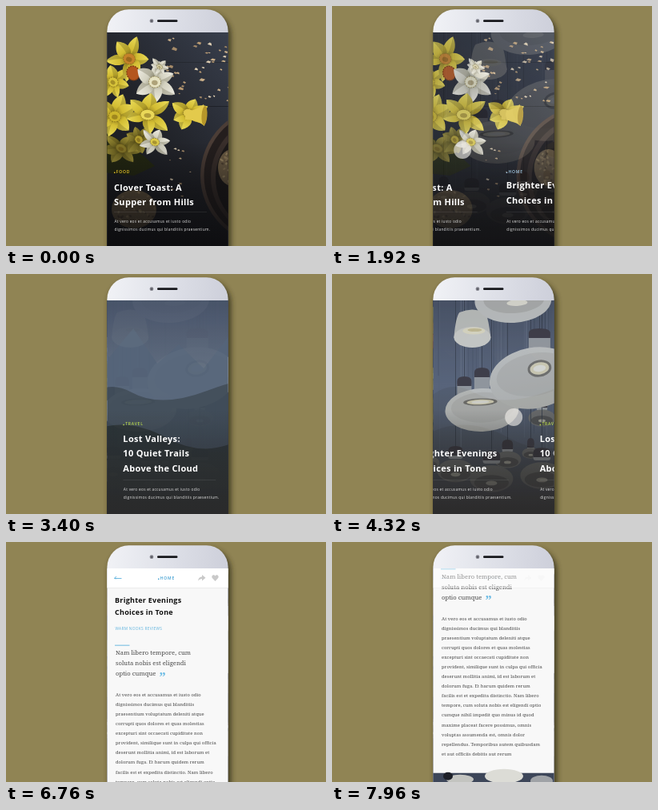
Write an HTML page that moves like this. It is 400 px wide and 300 px high and loops after 8 s.

```html
<!DOCTYPE html>
<html lang="en">
<head>
<meta charset="utf-8">
<title>Magazine app</title>
<style>
html, body { margin: 0; width: 100%; height: 100%; overflow: hidden; background: #908454; }
svg { display: block; width: 100vw; height: 100vh; }
.head { font: bold 11px "Open Sans", sans-serif; letter-spacing: .3px; fill: #fff; }
.tag { font: 600 5px "Open Sans", sans-serif; letter-spacing: .8px; }
.intro { font: 4.8px "Open Sans", sans-serif; letter-spacing: .26px; fill: #dedede; }
.title { font: bold 9px "Open Sans", sans-serif; letter-spacing: .25px; fill: #111; }
.by { font: 4.8px "Open Sans", sans-serif; letter-spacing: .3px; fill: #5fb3de; }
.quote { font: 7.6px "Noto Serif", serif; letter-spacing: .05px; fill: #484848; }
.body { font: 5.8px "Noto Serif", serif; letter-spacing: .06px; fill: #484848; }
</style>
</head>
<body>
<svg id="stage" viewBox="0 0 400 300" preserveAspectRatio="none"></svg>
<script>
const LOOP = 8000, PAGE = 151, DRIFT = 27;
const stage = document.getElementById('stage');

let seed = 11;
const rnd = (a, b) => {
  seed = (seed * 16807) % 2147483647;
  return a + (b - a) * seed / 2147483647;
};
const pick = list => list[Math.floor(rnd(0, list.length))];
const times = (n, fn) => Array.from({ length: n }, (_, i) => fn(i)).join('');
const rect = (x, y, w, h, fill, more = '') =>
  `<rect x="${x}" y="${y}" width="${w}" height="${h}" fill="${fill}" ${more}/>`;
const oval = (x, y, rx, ry, fill, turn = 0, more = '') =>
  `<ellipse cx="${x}" cy="${y}" rx="${rx}" ry="${ry}" fill="${fill}" transform="rotate(${turn} ${x} ${y})" ${more}/>`;
const path = (d, fill, more = '') => `<path d="${d}" fill="${fill}" ${more}/>`;
const text = (x, y, cls, s, more = '') => `<text x="${x}" y="${y}" class="${cls}" ${more}>${s}</text>`;
const lines = (x, y, step, cls, list) => list.map((s, i) => text(x, y + i * step, cls, s)).join('');
const grad = (id, dir, stops) => `<linearGradient id="${id}" ${dir}>` +
  stops.map(([o, c, a = 1]) => `<stop offset="${o}" stop-color="${c}" stop-opacity="${a}"/>`).join('') +
  '</linearGradient>';
const DOWN = 'x1="0" y1="0" x2="0" y2="1"';

// Pictures
function flower(x, y, r, paint, core, turn, squash = 1) {
  const leaf = i => {
    const len = r * rnd(.82, 1.12), w = r * rnd(.34, .5);
    const half = `M0 0C${w} ${-len * .25} ${w * .8} ${-len * .7} 0 ${-len}`;
    return `<g transform="rotate(${i * 60 + rnd(-14, 14)})">` +
      path(`${half}C${-w * .8} ${-len * .7} ${-w} ${-len * .25} 0 0Z`, `url(#${paint})`) +
      path(half + `Q${w * .25} ${-len * .5} 0 0Z`, '#2a2408', 'opacity=".2"') + '</g>';
  };
  return `<g transform="translate(${x} ${y}) rotate(${turn}) scale(1 ${squash})">` + times(6, leaf) +
    oval(0, 0, r * .28, r * .25, core, 0, 'stroke="#6e5a14" stroke-opacity=".5" stroke-dasharray="2 1"') +
    oval(0, r * .03, r * .14, r * .11, '#5a430c', 0, 'opacity=".4"') + '</g>';
}

function crumb(x, y, size) {
  const p = () => rnd(.5, 1.2) * size;
  return path(`M${x - p()} ${y}L${x - p() * .3} ${y - p() * .7} ${x + p()} ${y - p() * .3} ${x + p() * .6} ${y + p() * .6}Z`,
    pick(['#c9ae88', '#ddcdb2', '#a58a68', '#b99a72']));
}

const cookie = (x, y, rx, ry) => oval(x, y, rx, ry, '#6a5a42') + times(45, () => {
  const a = rnd(0, 6.28), d = Math.sqrt(rnd(0, .9));
  return oval(x + rx * d * Math.cos(a), y + ry * d * Math.sin(a), 1.8, 1.2,
    pick(['#8d7a58', '#43372a', '#a08c66']), rnd(0, 180), 'opacity=".7"');
});

function foodArt() {
  return rect(90, 33, 225, 267, 'url(#slate)') +
    rect(195, 125, 120, 1, '#15171c', 'opacity=".6"') + rect(195, 70, 120, .8, '#15171c', 'opacity=".4"') +
    times(56, () => crumb(rnd(202, 304), rnd(40, 120), rnd(1.4, 4))) +
    times(10, () => crumb(rnd(196, 246), rnd(178, 248), rnd(1.2, 2.8))) +
    oval(331, 212, 88, 87, '#4b3d36') + oval(332, 212, 84.5, 83, '#241e1d') +
    oval(337, 214, 81, 78, '#382e2a') + oval(340, 215, 78, 74, '#1b1818') +
    cookie(283, 202, 18, 23) + cookie(160, 254, 28, 24) +
    path('M100 150Q150 165 186 200L160 212 100 206Z', '#24280f', 'opacity=".9"') +
    flower(144, 178, 25, 'olive', '#847527', 25, .8) +
    flower(136, 138, 27, 'gold', '#cdb62c', 10) +
    flower(166, 167, 19, 'olive', '#b29e30', 50) +
    flower(134, 95, 23, 'gold', '#d8c43a', 40) +
    flower(154, 66, 27, 'gold', '#c5822a', 18) +
    oval(159, 84, 8, 9, '#b4561e', -20, 'stroke="#7e3910" stroke-width="1.4" stroke-dasharray="2 1"') +
    flower(186, 95, 27, 'cream', '#e6e2c2', 8, 1.05) +
    flower(192, 76, 13, 'cream', '#d8d3ae', 30, .8) +
    flower(186, 170, 21, 'cream', '#dcca4a', 20, .9) +
    flower(177, 136, 32, 'gold', '#ead858', 4, .82) +
    flower(228, 134, 24, 'gold', '#e0c84a', 14, .9) +
    path('M224 131Q236 132 247 123Q252 136 248 150Q238 142 224 142Z', '#e3ca4c') +
    oval(248, 137, 3.5, 12, '#b6962a', 4);
}

// A lampshade; lx, ly, lr and lt place its opening
function shade(x, y, rx, ry, turn, lx, ly, lr, lt) {
  return oval(x, y, rx, ry, 'url(#glass)', turn) +
    oval(x + 1, y - ry * .12, rx * .86, ry * .7, '#b4b2ab', turn, 'opacity=".4"') +
    oval(lx, ly, lr * 1.25, lt * 1.4, '#77736a', turn) +
    oval(lx, ly, lr, lt, '#efe7c4', turn) + oval(lx, ly, lr * .65, lt * .55, '#fffdf0', turn);
}
const stem = (x, y, h, w = 18) =>
  rect(x - .4, 33, .8, y - 33, '#2e3440') + rect(x - w / 2, y + 8, w, h, '#a4a7aa', 'rx="3"') +
  path(`M${x - w / 2} ${y + 12}V${y + 6}Q${x - w / 2} ${y} ${x} ${y}T${x + w / 2} ${y + 6}V${y + 12}Z`, '#37323a');

function lampArt() {
  const wire = () => rect(rnd(90, 310), 33, rnd(.4, 1.2), rnd(90, 210), pick(['#7b879c', '#323a4a']), 'opacity=".35"');
  const far = (x, y, r) => stem(x, y - r - 8, 8, r * .8) + oval(x, y, r, r * .62, '#73726e') +
    oval(x, y + r * .18, r * .8, r * .36, '#514f4d') + oval(x, y + r * .2, r * .26, r * .11, '#b9b5a4');
  return rect(90, 33, 225, 267, 'url(#dusk)') + times(45, wire) +
    far(268, 180, 17) + far(254, 224, 11) + far(225, 232, 17) + far(160, 246, 23) + far(205, 256, 27) + far(268, 252, 27) + far(125, 236, 15) +
    stem(171, 128, 27) + stem(193, 117, 36, 19) +
    shade(193, 170, 46, 27, -2, 191, 160, 17, 3.2) +
    path('M158 80Q160 54 165 48Q181 41 197 48Q201 54 204 80Z', '#d6d5cc') +
    oval(181, 79, 23, 13, '#e9e8df') + oval(183, 71, 14, 4.5, '#fff8d8') + oval(184, 70, 9, 2, '#e2d49c') +
    stem(265, 68, 34, 27) +
    shade(258, 130, 56, 38, -10, 265, 118, 12, 7.5) +
    oval(232, 33, 48, 28, '#d8d8d2', -3) + oval(233, 32, 38, 17, '#c2c1ba', -3) + oval(237, 36, 13, 4, '#fffbe8', -3);
}

function hillArt() {
  return rect(90, 33, 225, 267, 'url(#sky)') +
    path('M90 130L115 92 128 104 158 68 188 112 215 88 246 118 282 72 315 120V300H90Z', '#56657a') +
    path('M90 165Q120 128 156 148T250 146 315 138V300H90Z', '#404c59') +
    path('M90 205Q140 172 200 205T315 190V300H90Z', '#2a3337');
}

// Slides
const INTRO = ['At vero eos et accusamus et iusto odio', 'dignissimos ducimus qui blanditiis praesentium.'];
const slides = [
  { x: 135, tag: 'FOOD', hue: '#ecc62c', tagY: 209, y: 230.5, fade: 0, art: foodArt, head: ['Clover Toast: A', 'Supper from Hills'] },
  { x: 136, tag: 'HOME', hue: '#a5cde8', tagY: 209, y: 228.3, fade: 2, art: lampArt, head: ['Brighter Evenings', 'Choices in Tone'] },
  { x: 140, tag: 'TRAVEL', hue: '#b7d84b', tagY: 189.2, y: 209.8, fade: .85, art: hillArt, head: ['Lost Valleys:', '10 Quiet Trails', 'Above the Cloud'] }
];
const label = (x, y, s, hue) => rect(x, y - 1.4, 1.5, 1.4, hue) + text(x + 2.8, y, 'tag', s, `fill="${hue}"`);
const slide = (s, i) => `<g id="slide${i}">` + label(s.x, s.tagY, s.tag, s.hue) +
  lines(s.x, s.y, 18.6, 'head', s.head) +
  `<g class="fades">${rect(s.x, 257.5, 116, .5, '#fff', 'opacity=".15"')}${lines(s.x + .5, 270.5, 10.6, 'intro', INTRO)}</g></g>`;

const BODY = `At vero eos et accusamus et iusto odio
dignissimos ducimus qui blanditiis
praesentium voluptatum deleniti atque
corrupti quos dolores et quas molestias
excepturi sint occaecati cupiditate non
provident, similique sunt in culpa qui officia
deserunt mollitia animi, id est laborum et
dolorum fuga. Et harum quidem rerum
facilis est et expedita distinctio. Nam libero
tempore, cum soluta nobis est eligendi optio
cumque nihil impedit quo minus id quod
maxime placeat facere possimus, omnis
voluptas assumenda est, omnis dolor
repellendus. Temporibus autem quibusdam
et aut officiis debitis aut rerum`.split('\n');

const article = '<g id="article">' +
  lines(136, 75.5, 15, 'title', slides[1].head) +
  text(136.5, 109.8, 'by', 'WARM NOOKS REVIEWS') +
  rect(136, 128.7, 18.5, .9, '#5fb3de') +
  lines(137, 141, 12.9, 'quote', ['Nam libero tempore, cum', 'soluta nobis est eligendi', 'optio cumque']) +
  text(191.5, 174.5, 'quote', '”', 'style="font-size:17px;font-weight:bold;fill:#6bbbe4"') +
  lines(137, 193, 12.07, 'body', BODY) +
  rect(126, 384, 152, 60, '#3d4659') +
  oval(215, 388, 24, 9, '#dcdcd6') + oval(160, 392, 17, 6, '#c3c4c0') + oval(145, 388, 6, 5, '#1d2028') +
  oval(262, 394, 14, 7, '#9fa2a6') + '</g>';

const header = '<g id="header">' + rect(126, 33, 152, 24, '#fff') + rect(126, 57, 152, .6, '#e4e4e4') +
  '<g id="icons">' +
  path('M138 43L135.5 45.3 138 46M135.5 45.5H144.5', 'none', 'stroke="#5fb3de" stroke-width=".9"') +
  label(190, 47, 'HOME', '#3f9fd2') +
  path('M240 48.5Q241 43.5 245 43.6V41L249.5 44.8 245 48.4V46Q242 45.8 240 48.5Z', '#c9c9c9') +
  path('M261.5 49L257.8 45C256 42 259.8 39.6 261.5 42.4C263.2 39.6 267 42 265.2 45Z', '#c9c9c9') + '</g></g>';

stage.innerHTML = '<defs>' +
  grad('case', 'x1="0" y1="0" x2="1" y2=".12"', [[0, '#f1f2f6'], [.4, '#e2e4eb'], [1, '#cdcfda']]) +
  grad('slate', 'x1="0" y1="1" x2="1" y2="0"', [[0, '#141519'], [.5, '#212329'], [1, '#3d4453']]) +
  grad('dusk', DOWN, [[0, '#475063'], [.4, '#5a657c'], [.7, '#4c5361'], [1, '#3f3f42']]) +
  grad('sky', DOWN, [[0, '#485469'], [.5, '#6d7a8c'], [1, '#5d6873']]) +
  grad('glass', DOWN, [[0, '#dadad5'], [1, '#c8c7c0']]) +
  grad('gold', DOWN, [[0, '#eadb58'], [.6, '#d3bd33'], [1, '#84701a']]) +
  grad('olive', DOWN, [[0, '#a3953a'], [.6, '#756a24'], [1, '#37320f']]) +
  grad('cream', DOWN, [[0, '#eeece2'], [.6, '#d3d1c0'], [1, '#8d8b74']]) +
  grad('night', DOWN, [[0, '#0c0c0e', 0], [.45, '#0c0c0e', .5], [1, '#0c0c0e', .9]]) +
  grad('veil', DOWN, [[0, '#2b2a2a', 0], [.5, '#2b2a2a', .45], [1, '#2b2a2a', .88]]) +
  '<clipPath id="screen"><rect x="126.4" y="33" width="151.2" height="267"/></clipPath>' +
  '<filter id="blur" x="-30%" y="-10%" width="160%" height="120%"><feGaussianBlur stdDeviation="3"/></filter></defs>' +
  rect(0, 0, 400, 300, '#908454') +
  rect(128, 8, 153.5, 330, '#2e2914', 'rx="28" filter="url(#blur)" opacity=".75"') +
  rect(126.4, 4.3, 151.2, 340, 'url(#case)', 'rx="27"') +
  oval(182, 18.7, 2.4, 2.4, '#85868e') + oval(182, 18.7, 1.2, 1.2, '#5c5d66') +
  rect(189, 17.3, 25.5, 2.8, '#17181c', 'rx="1.4"') +
  '<g clip-path="url(#screen)">' + rect(126, 33, 152, 267, '#191a1e') +
  slides.map((s, i) => `<g id="art${i}"><g id="move${i}">${s.art()}</g>` +
    rect(126, 170, 152, 130, i ? 'url(#veil)' : 'url(#night)', 'class="dim"') + '</g>').join('') +
  slides.map(slide).join('') +
  `<g id="panel">${rect(126, 33, 152, 500, '#f8f8f8')}${article}</g>` + header +
  oval(0, 0, 11, 11, '#f4f1ec', 0, 'id="touch"') + '</g>';

const $ = id => document.getElementById(id);
const parts = slides.map((s, i) => ({ fade: s.fade, art: $('art' + i), move: $('move' + i), slide: $('slide' + i) }));
const fades = stage.querySelectorAll('.fades'), dims = stage.querySelectorAll('.dim');
const ramp = (t, a, b) => Math.min(1, Math.max(0, (t - a) / (b - a)));
const ease = (t, a, b) => (1 - Math.cos(Math.PI * ramp(t, a, b))) / 2;
const shift = (el, x, y) => el.setAttribute('transform', `translate(${x.toFixed(2)} ${y.toFixed(2)})`);
const show = (el, a) => el.setAttribute('opacity', a.toFixed(3));

function draw(t) {
  const first = ease(t, 1400, 2500), second = ease(t, 2880, 3480), back = ease(t, 3720, 4580);
  const page = first + second - back;
  parts.forEach((p, i) => {
    const off = i - page;
    show(p.art, Math.pow(ramp(page, i - 1, i), p.fade));
    shift(p.move, off * DRIFT, 0);
    shift(p.slide, off * PAGE, 0);
  });

  const rise = 267 * ease(t, 5400, 6488);
  shift($('panel'), 0, 267 - rise);
  const calm = ramp(t, 5240, 5500);
  fades.forEach(el => show(el, 1 - calm));
  dims.forEach(el => show(el, 1 - .45 * calm));
  shift($('article'), 0, -96.3 * ease(t, 6990, 8030));
  show($('header'), ramp(t, 6400, 6740) * (1 - ramp(t, 7720, 8140)));
  show($('icons'), 1 - .85 * ramp(t, 6960, 7900));

  // Each gesture: start, fade-out start, fade-out end, x, y
  const touches = [
    [1280, 2000, 2200, 232 - 150 * first, 180],
    [2840, 3220, 3400, 240 - 120 * second, 180],
    [3720, 4400, 4680, 140 + 110 * back, 179],
    [5240, 5800, 6000, 202, 197 - rise]
  ];
  const now = touches.find(g => t >= g[0] && t < g[2]);
  show($('touch'), now ? .62 * ramp(t, now[0], now[0] + 140) * (1 - ramp(t, now[1], now[2])) : 0);
  if (now) shift($('touch'), now[3], now[4]);
}

const start = performance.now();
function tick() {
  draw((performance.now() - start) % LOOP);
  requestAnimationFrame(tick);
}
tick();
</script>
</body>
</html>
```
